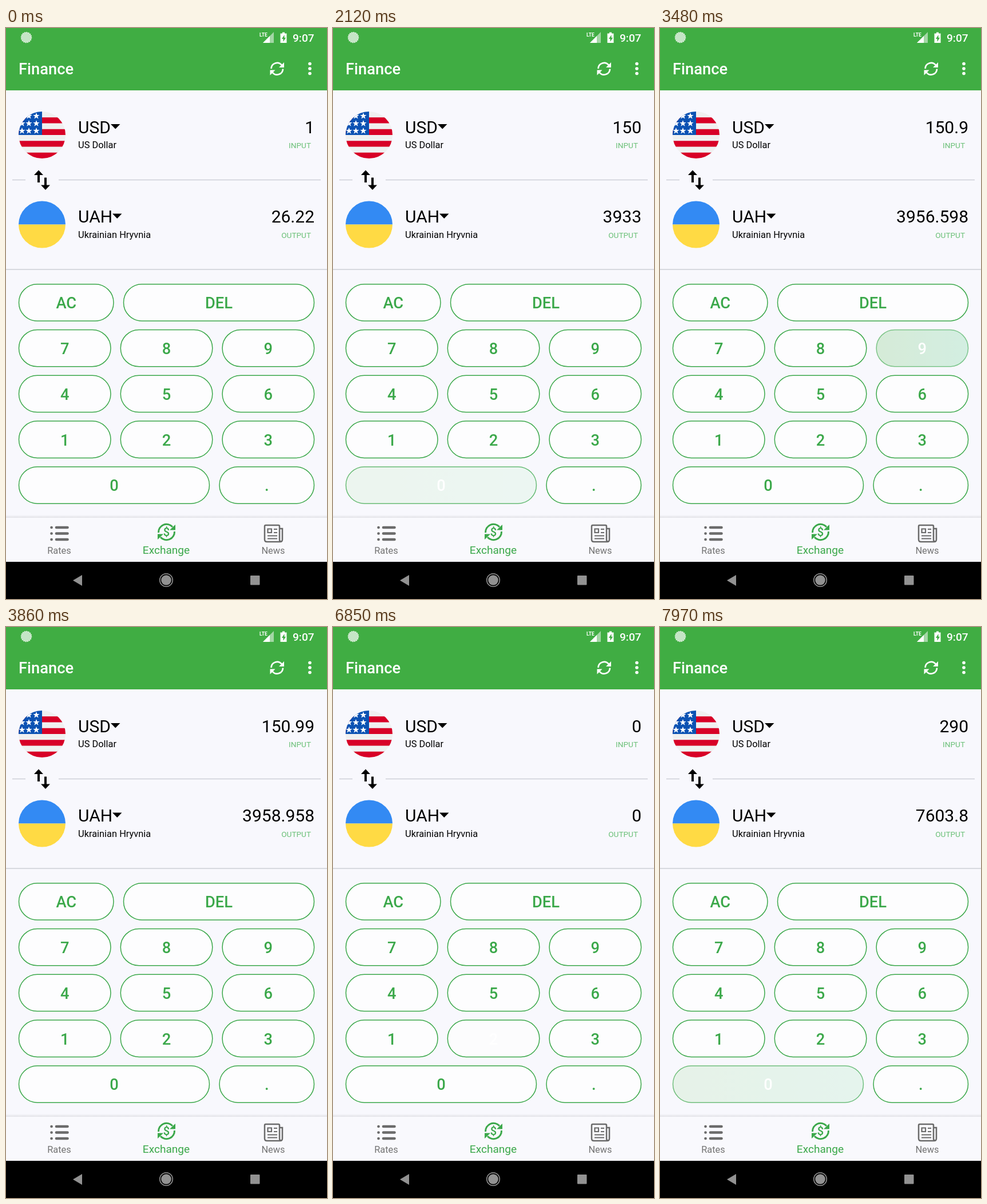
Animation of 561x998 px, one loop 8000 ms. Source, as an HTML page:

```html
<!DOCTYPE html>
<html lang="en">
<head>
<meta charset="utf-8">
<title>Currency exchange</title>
<style>
  html, body { margin: 0; width: 100%; height: 100%; overflow: hidden; background: #f8f8fd; }
  svg { display: block; width: 100vw; height: 100vh; font-family: Roboto, sans-serif; }
  .code { font-size: 30px; }
  .name { font-size: 16.4px; }
  .hint { font-size: 13.6px; fill: #6bc078; text-anchor: end; }
  .value { font-size: 30px; text-anchor: end; }
  .key text { font-size: 27.3px; font-weight: 500; text-anchor: middle; }
  .tab { font-size: 16.4px; text-anchor: middle; fill: #737373; }
  .white { fill: #fff; }
  .divider { stroke: #cdcfd6; stroke-width: 1.5; }
</style>
</head>
<body>
<svg viewBox="0 0 561 998" preserveAspectRatio="none">
  <defs>
    <linearGradient id="pressed">
      <stop offset="0" stop-color="#41ac43"/>
      <stop offset="1" stop-color="#35bb73"/>
    </linearGradient>
    <linearGradient id="shadow" x2="0" y2="1">
      <stop offset="0" stop-color="#000" stop-opacity="0"/>
      <stop offset="1" stop-color="#000" stop-opacity=".09"/>
    </linearGradient>
    <clipPath id="round"><circle cx="63" cy="187" r="41"/></clipPath>
    <path id="star" d="M0-6 1.5-2H5.7L2.3.6 3.6 4.8 0 2.3-3.6 4.8-2.3.6-5.7-2H-1.5Z" fill="#fff"/>
  </defs>

  <rect width="561" height="998" fill="#f8f8fd"/>
  <rect width="561" height="109" fill="#40ad43"/>

  <!-- Status bar -->
  <circle cx="35.5" cy="16.5" r="9" fill="#c5e5c6"/>
  <circle cx="35.5" cy="16.5" r="9" fill="none" stroke="#e4f3e4" stroke-width="1.5" stroke-dasharray="2 1.5"/>
  <text class="white" x="443" y="15" font-size="8.5" font-weight="700">LTE</text>
  <path d="M449 26 468 7V26Z" fill="#a3d7a5"/>
  <path class="white" d="M449 26 461 14V26Z"/>
  <path class="white" d="M483 7.5h4v2h3.5v16.5h-11V9.5h3.5Z"/>
  <path d="M486.5 12 482 19h2.500v5l4.500-7h-2.500Z" fill="#40ad43"/>
  <text class="white" x="501" y="23.500" font-size="19.100" font-weight="500">9:07</text>

  <!-- Toolbar -->
  <text class="white" x="22" y="81" font-size="27.3" font-weight="500">Finance</text>
  <g fill="none" stroke="#fff" stroke-width="2.7">
    <path d="M463.500 71a10.300 10.300 0 0 1 18.500-6M484 71.500a10.300 10.300 0 0 1-18.500 6"/>
  </g>
  <path class="white" d="M486 60v9h-9ZM461.500 82.500v-9h9Z"/>
  <g class="white">
    <circle cx="531" cy="62.500" r="2.800"/><circle cx="531" cy="71" r="2.800"/><circle cx="531" cy="79.500" r="2.800"/>
  </g>

  <!-- Input currency -->
  <g clip-path="url(#round)">
    <rect x="22" y="146" width="82" height="82" fill="#f0f0f0"/>
    <path d="M22 161.400h82M22 181.900h82M22 202.400h82M22 222.900h82" stroke="#d80027" stroke-width="10.250"/>
    <rect x="22" y="146" width="41" height="41" fill="#0b52b3"/>
    <g id="stars"></g>
  </g>
  <text class="code" x="126" y="184">USD</text>
  <path d="M183 168h16.500l-8.250 8.500Z"/>
  <text class="name" x="126" y="210">US Dollar</text>
  <text class="value" id="input" x="539" y="184"></text>
  <text class="hint" x="533" y="210">INPUT</text>

  <path class="divider" d="M11 265.500H34M92 265.500H550M0 422H561"/>
  <path d="M49 257l8-8.500 8 8.500h-6v13h-4v-13ZM61 274.500h6v-13h4v13h6l-8 8.500Z"/>

  <!-- Output currency -->
  <path d="M22 343.500a41 41 0 0 1 82 0Z" fill="#338af3"/>
  <path d="M22 343.500a41 41 0 0 0 82 0Z" fill="#ffda44"/>
  <text class="code" x="126" y="340">UAH</text>
  <path d="M186 324.500h16.500l-8.250 8.500Z"/>
  <text class="name" x="126" y="366.500">Ukrainian Hryvnia</text>
  <text class="value" id="output" x="539" y="340"></text>
  <text class="hint" x="533" y="366.500">OUTPUT</text>

  <g id="keys"></g>

  <!-- Tabs -->
  <rect y="851" width="561" height="5" fill="url(#shadow)"/>
  <rect y="856" width="561" height="77" fill="#f9f9fd"/>
  <g stroke="#6b6b6b" stroke-width="4.600" stroke-linecap="round">
    <path d="M79.500 873h.1M79.500 883.500h.1M79.500 894h.1M88 873h19.500M88 883.500h19.500M88 894h19.500"/>
  </g>
  <text class="tab" x="93" y="919">Rates</text>

  <g fill="none" stroke="#3ba84a" stroke-width="3">
    <path d="M266.500 882a14 14 0 0 1 24.500-10M294.500 880a14 14 0 0 1-24.500 10"/>
  </g>
  <path d="M296 868v9.500h-10ZM265 894v-9.500h10Z" fill="#3ba84a"/>
  <text x="280.500" y="888" font-size="20" font-weight="500" text-anchor="middle" fill="#3ba84a">$</text>
  <text x="280" y="919" font-size="19.100" text-anchor="middle" fill="#3ba84a">Exchange</text>

  <g fill="none" stroke="#6b6b6b" stroke-width="2.500">
    <path d="M478 874V871q0-2-2-2H454q-2 0-2 2V894q0 4 4 4H479q4 0 4-4V875h-5V894q0 4 3 4"/>
    <path d="M457.500 875.500h6.500v6.500h-6.500ZM468 876h6M468 882h6M457 887.500h17M457 892.500h17" stroke-width="2.200"/>
  </g>
  <text class="tab" x="467" y="919">News</text>

  <!-- System navigation -->
  <rect y="933" width="561" height="65"/>
  <g fill="#929292">
    <path d="M117 965.500 133 956V975Z"/>
    <circle cx="280" cy="965" r="8.800"/>
    <circle cx="280" cy="965" r="11.300" fill="none" stroke="#929292" stroke-width="1.500"/>
    <rect x="427" y="957" width="16.500" height="16.500" rx="1"/>
  </g>
</svg>
<script>
const LOOP = 8000, RATE = 26.22, FADE = 180, TAP = 110, CLICK_DELAY = 45;
const GREEN = '#3ba84a';
const $ = id => document.getElementById(id);

function add(parent, tag, attrs, text = '') {
  const node = document.createElementNS('http://www.w3.org/2000/svg', tag);
  for (const name in attrs) node.setAttribute(name, attrs[name]);
  node.textContent = text;
  return parent.appendChild(node);
}

for (const y of [154, 167, 180])
  for (const x of [28, 40, 53])
    add($('stars'), 'use', { href: '#star', x, y });

const keys = {};
function addKey(label, x, y, width) {
  const group = add($('keys'), 'g', { class: 'key' });
  const box = { x, y, width, height: 64.3, rx: 32.1 };
  const pressed = { ...box, fill: 'url(#pressed)', opacity: 0 };
  keys[label] = {
    below: add(group, 'rect', pressed),
    normal: add(group, 'rect', { ...box, fill: '#fdfdfe', stroke: GREEN, 'stroke-width': 1.5 }),
    above: add(group, 'rect', pressed),
    text: add(group, 'text', { x: x + width / 2, y: y + 42.5 }, label)
  };
}

const rowY = row => 447.7 + row * 79.8;
addKey('AC', 22.5, rowY(0), 165.5);
addKey('DEL', 205.5, rowY(0), 333);
['789', '456', '123'].forEach((row, r) =>
  [...row].forEach((digit, c) => addKey(digit, 22.5 + c * 177.8, rowY(r + 1), 160.5)));
addKey('0', 22.5, rowY(4), 333);
addKey('.', 373, rowY(4), 165.5);

const presses = [
  { key: '5', at: 1500 },
  { key: '0', at: 2070 },
  { key: '.', at: 2965 },
  { key: '9', at: 3400 },
  { key: '9', at: 3570 },
  { key: 'AC', at: 5850, hold: 320 },
  { key: '2', at: 6850 },
  { key: '9', at: 7390 },
  { key: '0', at: 7910 }
];

// A quick tap registers at once; a longer press registers on release.
const clickTime = p => p.at + (p.hold || CLICK_DELAY);

function valueAt(t) {
  let value = '1';
  for (const p of presses) {
    if (t < clickTime(p)) break;
    value = p.key === 'AC' ? '0' : value === '0' ? p.key : value + p.key;
  }
  return value;
}

function drawKey(label, t) {
  const key = keys[label];
  const press = presses.filter(p => p.key === label && p.at <= t).pop();
  let below = 0, normal = 1, above = 0, held = false;
  if (press) {
    const age = t - press.at, hold = press.hold || TAP;
    held = age < hold;
    if (held) {
      below = Math.min(1, age / FADE);
      normal = 1 - below;
    } else {
      normal = Math.min(1, (age - hold) / FADE);
      above = 1 - normal;
    }
  }
  key.below.setAttribute('opacity', below);
  key.normal.setAttribute('opacity', normal);
  key.above.setAttribute('opacity', above);
  key.text.setAttribute('fill', held ? '#fff' : GREEN);
}

function render(t) {
  const value = valueAt(t);
  $('input').textContent = value;
  $('output').textContent = Math.round(parseFloat(value) * RATE * 1000) / 1000;
  for (const label in keys) drawKey(label, t);
}

const start = performance.now();
function tick() {
  render((performance.now() - start) % LOOP);
  requestAnimationFrame(tick);
}
tick();
</script>
</body>
</html>
```
